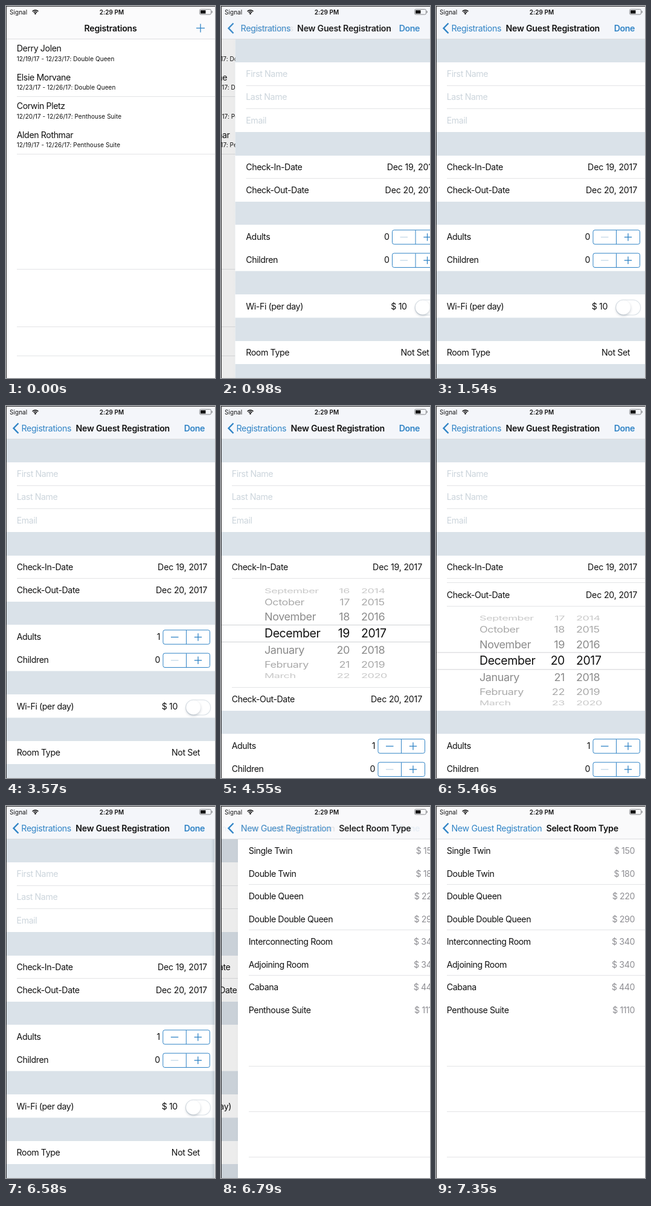
Write an HTML page with a canvas that moves like this. It is 346 px wide and 614 px high and loops after 8 s.

```html
<!DOCTYPE html>
<html lang="en">
<head>
<meta charset="utf-8">
<title>Guest registration</title>
<style>
html, body { margin: 0; width: 100%; height: 100%; overflow: hidden; background: #fff; }
canvas { display: block; }
</style>
</head>
<body>
<canvas></canvas>
<script>
const W = 346, H = 614, LOOP = 8000;
const BLUE = '#3084c6', PALE = '#c3d8e8', GROUP = '#dae2e9', LINE = '#e3e4e6';
const ROW = 38.3, PICKER = 180;
const PUSH_FORM = 757, PUSH_ROOMS = 6578;

const canvas = document.querySelector('canvas');
const c = canvas.getContext('2d');
const dpr = window.devicePixelRatio || 1;
canvas.width = W * dpr;
canvas.height = H * dpr;
canvas.style.width = W + 'px';
canvas.style.height = H + 'px';

const guests = [
  ['Derry Jolen', '12/19/17 - 12/23/17: Double Queen'],
  ['Elsie Morvane', '12/23/17 - 12/26/17: Double Queen'],
  ['Corwin Pletz', '12/20/17 - 12/26/17: Penthouse Suite'],
  ['Alden Rothmar', '12/19/17 - 12/26/17: Penthouse Suite']
];
const rooms = [
  ['Single Twin', 150], ['Double Twin', 180], ['Double Queen', 220],
  ['Double Double Queen', 290], ['Interconnecting Room', 340],
  ['Adjoining Room', 340], ['Cabana', 440], ['Penthouse Suite', 1110]
];
const months = ['January', 'February', 'March', 'April', 'May', 'June', 'July',
  'August', 'September', 'October', 'November', 'December'];
const bars = [
  { title: 'Registrations', x: 129.5, fill: '#fbfbfc' },
  { title: 'New Guest Registration', x: 115.5, back: 'Registrations', fill: '#f4f6fa' },
  { title: 'Select Room Type', x: 182.5, back: 'New Guest Registration', fill: '#fafafb' }
];

const clamp = v => Math.min(1, Math.max(0, v));
const mix = (a, b, p) => a + (b - a) * p;
const ease = (t, start, ms = 320) => {
  const p = clamp((t - start) / ms);
  return p * p * (3 - 2 * p);
};
// critically damped spring, 0 to 1
const spring = (t, start) => {
  const k = Math.max(0, t - start) * 0.0195;
  return k > 12 ? 1 : 1 - (1 + k) * Math.exp(-k);
};

function text(s, x, y, { color = '#111', size = 14.2, weight = 400, align = 'left', track = -0.41 } = {}) {
  c.font = `${weight} ${size}px Inter, "Open Sans", sans-serif`;
  c.letterSpacing = track + 'px';
  c.textAlign = align;
  c.fillStyle = color;
  c.fillText(s, x, y);
}

function rect(x, y, w, h, color) {
  c.fillStyle = color;
  c.fillRect(x, y, w, h);
}

function path(color, width, ...points) {
  c.beginPath();
  points.forEach(([x, y], i) => i ? c.lineTo(x, y) : c.moveTo(x, y));
  c.strokeStyle = color;
  c.lineWidth = width;
  c.stroke();
}

function box(x, y, w, h, r, color, width) {
  c.beginPath();
  c.roundRect(x, y, w, h, r);
  c.strokeStyle = color;
  c.lineWidth = width;
  c.stroke();
}

function plus(x, y, r, width) {
  path(BLUE, width, [x - r, y], [x + r, y]);
  path(BLUE, width, [x, y - r], [x, y + r]);
}

const rule = y => rect(18, Math.round(y), W - 18, 1, LINE);

function drawGuests() {
  rect(0, 0, W, H, '#fff');
  guests.forEach(([name, stay], i) => {
    const y = 47.5 * i;
    text(name, 17.7, y + 75.3);
    text(stay, 17.7, y + 90.6, { size: 10, track: 0.06 });
  });
  [149, 244, 434, 529, 577].forEach(rule);
}

function drawRooms() {
  rect(0, 0, W, H, '#fff');
  rooms.forEach(([name, price], i) => {
    const y = 79.3 + 37.5 * i;
    text(name, 17.7, y);
    text('$ ' + price, 329, y, { color: '#8e8e93', align: 'right' });
  });
  [129, 204, 279, 429, 504, 579].forEach(rule);
}

function drawPicker(y, height, day) {
  c.save();
  c.beginPath();
  c.rect(0, y, W, height);
  c.clip();
  for (let k = -3; k <= 3; k++) {
    const a = k * 0.33;
    c.save();
    c.translate(0, y + PICKER / 2 + 84 * Math.sin(a));
    c.scale(1, Math.cos(a));
    c.globalAlpha = k ? 0.62 - Math.abs(k) * 0.13 : 1;
    const style = { size: k ? 18 : 19.5 };
    text(months[(11 + k) % 12], 72, 7, style);
    text((day + k + 30) % 31 + 1, 213, 7, { ...style, align: 'right' });
    text(2017 + k, 232, 7, style);
    c.restore();
  }
  rect(0, y + 76, W, 1, '#d0d2d5');
  rect(0, y + 104, W, 1, '#d0d2d5');
  c.restore();
}

function drawStepper(label, count, y) {
  text(label, 17.7, y + 5);
  text(count, 255, y + 5, { align: 'right' });
  box(260, y - 11.2, 77.5, 23.4, 3, BLUE, 1);
  path(BLUE, 1, [298.5, y - 11], [298.5, y + 12]);
  path(count ? BLUE : PALE, 1.3, [273, y + 0.5], [285.5, y + 0.5]);
  plus(318, y + 0.5, 6.2, 1.3);
}

function drawForm(t) {
  const inGap = PICKER * (ease(t, 4110) - ease(t, 5180));
  const outGap = PICKER * (ease(t, 5180) - ease(t, 6070));
  const right = { align: 'right' };
  const date = { align: 'right', track: -0.2 };
  const group = (y, h) => rect(0, y, W, h, '#fff');

  rect(0, 0, W, H, GROUP);
  group(93, 115);
  ['First Name', 'Last Name', 'Email'].forEach((s, i) =>
    text(s, 17.7, 117 + ROW * i, { color: '#ccd5dc' }));
  rule(131);
  rule(169);

  group(247, 76 + inGap + outGap);
  text('Check-In-Date', 17.7, 271);
  text('Dec 19, 2017', 333, 271, date);
  rule(284);
  if (inGap > 0 && t < 5180) drawPicker(285, inGap, 19);
  if (inGap > 1) rule(284 + inGap);
  text('Check-Out-Date', 17.7, 309.2 + inGap);
  text('Dec 20, 2017', 333, 309.2 + inGap, date);
  if (outGap > 1) {
    rule(323 + inGap);
    if (t < 6070) drawPicker(323 + inGap, outGap, 20);
  }

  c.save();
  c.translate(0, inGap + outGap);
  group(361, 76.5);
  drawStepper('Adults', t < 2030 ? 0 : 1, 381);
  drawStepper('Children', 0, 419.3);

  group(476, 38.5);
  text('Wi-Fi (per day)', 17.7, 500.7);
  text('$ 10', 284, 500.7, right);
  box(297.7, 485.2, 41, 25, 12.5, '#dfe5ea', 1.3);
  c.save();
  c.shadowColor = 'rgba(60,80,100,.3)';
  c.shadowBlur = 4 * dpr;
  c.shadowOffsetY = 2 * dpr;
  c.beginPath();
  c.arc(310.2, 497.5, 11.8, 0, 7);
  c.fillStyle = '#fff';
  c.fill();
  c.restore();

  group(553, 38);
  text('Room Type', 17.7, 577.2);
  text('Not Set', 321, 577.2, right);
  c.restore();
}

const screens = [drawGuests, drawForm, drawRooms];

function drawScreens(i, p, t) {
  c.save();
  c.translate(-0.3 * W * p, 0);
  screens[i](t);
  c.restore();
  const pushing = i < 2 && t >= (i ? PUSH_ROOMS : PUSH_FORM);
  if (!pushing) return;
  const x = W * (1 - p);
  rect(0, 0, x, H, `rgba(0,0,0,${0.08 * p})`);
  const shade = c.createLinearGradient(x - 6, 0, x, 0);
  shade.addColorStop(0, 'rgba(60,75,90,0)');
  shade.addColorStop(1, `rgba(60,75,90,${0.16 * (1 - p)})`);
  rect(x - 6, 54, 6, H, shade);
  c.save();
  c.translate(x, 0);
  screens[i + 1](t);
  c.restore();
}

// d: 0 in place, 1 still to come, -1 gone
function drawBarItem(i, d) {
  const { title, x, back } = bars[i];
  const bold = { weight: 600, track: -0.25 };
  c.globalAlpha = 1 - Math.abs(d);
  text(title, d < 0 ? mix(x, 26, -d) : x + 156 * d, 41.5, bold);
  if (back) {
    const backX = d < 0 ? 25.5 + 100 * d : mix(25.5, bars[i - 1].x, d);
    text(back, backX, 41.5, { color: BLUE, track: -0.35 });
  }
  if (i === 0) plus(322, 36.5, 7, 1.3);
  if (i === 1) text('Done', 294.7, 41.5, { ...bold, color: BLUE, track: -0.41 });
  c.globalAlpha = 1;
}

function drawBar(i, p) {
  rect(0, 0, W, 54, bars[i].fill);
  if (i < 2) {
    c.globalAlpha = p;
    rect(0, 0, W, 54, bars[i + 1].fill);
    c.globalAlpha = 1;
  }
  rect(0, 54, W, 1, '#dcdde0');
  drawBarItem(i, -p);
  if (i < 2 && p > 0) drawBarItem(i + 1, 1 - p);
  c.globalAlpha = i ? 1 : p;
  path(BLUE, 2.4, [20.5, 28.5], [12.5, 36.7], [20.5, 45]);
  c.globalAlpha = 1;
}

function drawStatus() {
  text('Signal', 6, 13.6, { size: 10, track: 0.06 });
  text('2:29 PM', 175, 13.8, { size: 10, weight: 600, align: 'center', track: 0.06 });
  c.strokeStyle = '#111';
  c.lineWidth = 1.7;
  for (const r of [3.6, 6.4]) {
    c.beginPath();
    c.arc(48.5, 13.2, r, -Math.PI * 0.77, -Math.PI * 0.23);
    c.stroke();
  }
  c.beginPath();
  c.arc(48.5, 12.6, 1.4, 0, 7);
  c.fillStyle = '#111';
  c.fill();
  box(320.5, 5.5, 19, 8.5, 2, '#85878a', 1);
  rect(322, 7, 8.5, 5.5, '#111');
  rect(340.5, 8.2, 1.3, 3.2, '#85878a');
}

function draw(t) {
  const first = spring(t, PUSH_FORM), second = spring(t, PUSH_ROOMS);
  const i = second === 1 ? 2 : first === 1 ? 1 : 0;
  const p = i === 2 ? 0 : i ? second : first;
  c.setTransform(dpr, 0, 0, dpr, 0, 0);
  drawScreens(i, p, t);
  drawBar(i, p);
  drawStatus();
  rect(0, 0, W, 1, '#2a2a2c');
  rect(0, 0, 1, H, '#2a2a2c');
}

function tick() {
  draw(performance.now() % LOOP);
  requestAnimationFrame(tick);
}
tick();
</script>
</body>
</html>
```
